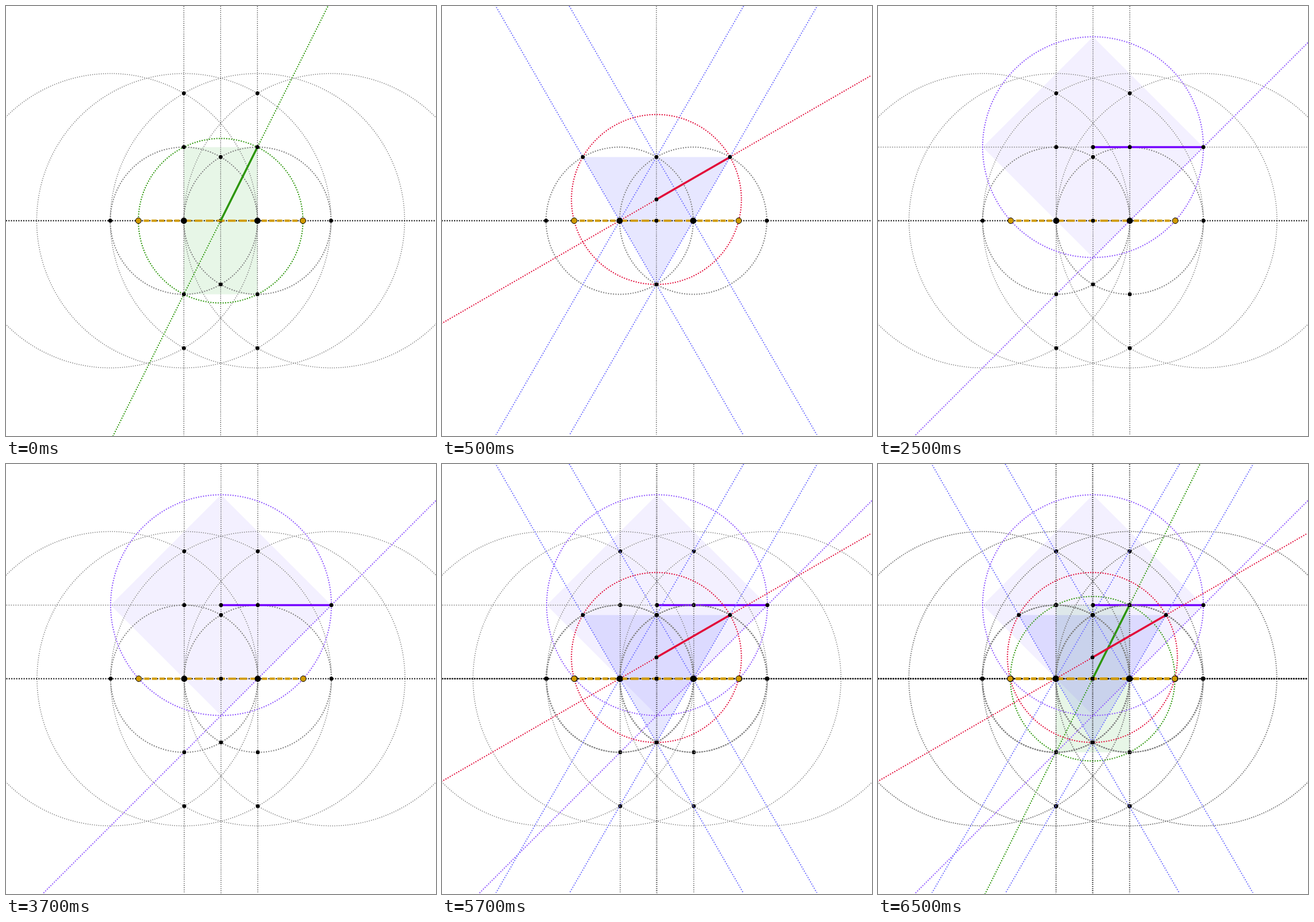
An HTML page with a canvas for the animation above (8 s loop, 748 by 748 pixels).

```html
<!DOCTYPE html>
<html lang="en">
<head>
<meta charset="utf-8">
<title>Golden ratio constructions</title>
<style>
  html, body { margin: 0; width: 100%; height: 100%; overflow: hidden; background: #fff; }
  canvas { display: block; width: 100%; height: 100%; }
</style>
</head>
<body>
<canvas id="stage" width="748" height="748"></canvas>
<script>
const ctx = document.getElementById('stage').getContext('2d');
const SIZE = 748, AXIS = 373.5, U = 64, R3 = Math.sqrt(3);
const GRAY = '#808080', GOLD = '#d09a00', BLUE = '#7676ff';
const GREEN = '#2c960a', RED = '#e20c3a', VIOLET = '#9058ff';
const TIP = U * R3;              // height of the small circles' crossing
const EDGE = U * Math.sqrt(5);   // half the golden segment

// Coordinates are relative to the midpoint of the base segment, y down.
function stroke(color, width, dash) {
  ctx.strokeStyle = color;
  ctx.lineWidth = width;
  ctx.setLineDash(dash);
  ctx.stroke();
}

const dotted = width => [width, 2.3];

function line(x1, y1, x2, y2, color, width, dash = dotted(width)) {
  ctx.beginPath();
  ctx.moveTo(x1, y1);
  ctx.lineTo(x2, y2);
  stroke(color, width, dash);
}

// Dotted line through a point, reaching past the stage.
function ray(x, y, dx, dy, color) {
  const k = 1000 / Math.hypot(dx, dy);
  line(x - dx * k, y - dy * k, x + dx * k, y + dy * k, color, 2);
}

function circle(x, y, r, color, width = 2) {
  ctx.beginPath();
  ctx.arc(x, y, r, 0, 2 * Math.PI);
  stroke(color, width, dotted(width));
}

function polygon(points, color) {
  ctx.beginPath();
  points.forEach(p => ctx.lineTo(...p));
  ctx.fillStyle = color;
  ctx.fill();
}

function dot(x, y, r = 3.4, color = '#000') {
  ctx.beginPath();
  ctx.arc(x, y, r, 0, 2 * Math.PI);
  ctx.fillStyle = color;
  ctx.fill();
  if (color !== '#000') stroke('#000', 1, []);
}

function base() {
  for (const s of [-1, 1]) circle(s * U, 0, 2 * U, GRAY);
  line(-AXIS, 0, AXIS + 2, 0, '#000', 2);
  line(0, -AXIS, 0, AXIS + 2, '#333', 1.3);
}

function grid() {
  for (const s of [-1, 1]) {
    for (const x of [U, 3 * U]) circle(s * x, 0, 4 * U, GRAY, 1.5);
    line(s * U, -AXIS, s * U, AXIS + 2, '#444', 1.4);
  }
}

function gridDots() {
  for (const x of [-U, U])
    for (const y of [2 * U, 2 * TIP]) {
      dot(x, y);
      dot(x, -y);
    }
}

// Gold dashes, longer between the two base points.
function goldBar() {
  for (const s of [-1, 1])
    line(s * (EDGE - 9.5), 0, s * U, 0, GOLD, 3.8, [9, 4.3]);
  for (let k = -3; k <= 3; k++) {
    const x = k * 19.3;
    line(Math.max(-U, x - 6.7), 0, Math.min(U, x + 6.7), 0, GOLD, 3.8, []);
  }
}

function baseDots() {
  for (const s of [-1, 1]) {
    dot(s * 3 * U, 0);
    dot(0, s * TIP);
    dot(s * U, 0, 5.4);
    dot(s * EDGE, 0, 5, GOLD);
  }
}

// Each figure: midpoint x, visible width and height, shaded area, linework.
const rectangle = {
  x: 373.4, w: 748, h: 748,
  fill() {
    polygon([[-U, -2 * U], [U, -2 * U], [U, 2 * U], [-U, 2 * U]], 'rgba(5,155,5,.095)');
  },
  draw() {
    grid();
    base();
    circle(0, 0, EDGE, GREEN);
    ray(0, 0, 1, -2, GREEN);
    dot(0, 0);
    goldBar();
    line(0, 0, U, -2 * U, GREEN, 3.5, []);
    gridDots();
    baseDots();
  }
};

const triangle = {
  x: 373, w: 746, h: 746,
  fill() {
    polygon([[-2 * U, -TIP], [2 * U, -TIP], [0, TIP]], 'rgba(5,5,255,.095)');
  },
  draw() {
    const cy = -TIP / 3;
    base();
    for (const s of [-1, 1])
      for (const y of [-TIP, TIP]) ray(0, y, s, R3, BLUE);
    circle(0, cy, 4 * U / R3, RED);
    ray(0, cy, R3, -1, RED);
    goldBar();
    line(0, cy, 2 * U, -TIP, RED, 3.5, []);
    baseDots();
    for (const x of [-2 * U, 2 * U]) dot(x, -TIP);
    dot(0, cy);
    dot(0, 0);
  }
};

const square = {
  x: 374, w: 748, h: 747, cy: -2 * U, r: 3 * U,
  fill() {
    const { cy, r } = this;
    polygon([[0, cy - r], [r, cy], [0, cy + r], [-r, cy]], 'rgba(135,105,255,.1)');
  },
  draw() {
    const { cy, r } = this;
    grid();
    base();
    line(-AXIS, cy, AXIS + 2, cy, GRAY, 1.7);
    circle(0, cy, r, VIOLET);
    ray(0, U, 1, -1, VIOLET);
    goldBar();
    line(0, cy, r, cy, '#7300ff', 3.5, []);
    gridDots();
    baseDots();
    dot(0, cy);
    dot(r, cy);
    dot(0, 0);
  }
};

const scenes = [
  [0, [rectangle]],
  [500, [triangle]],
  [2500, [square]],
  [4500, [square, triangle]],
  [6500, [rectangle, square, triangle]]
];

// All shaded areas lie below all linework.
function render(figures) {
  ctx.fillStyle = '#fff';
  ctx.fillRect(0, 0, SIZE, SIZE);
  for (const pass of ['fill', 'draw'])
    for (const figure of figures) {
      ctx.save();
      ctx.beginPath();
      ctx.rect(0, 0, figure.w, figure.h);
      ctx.clip();
      ctx.translate(figure.x, AXIS);
      figure[pass]();
      ctx.restore();
    }
}

let shown;
function tick() {
  const t = performance.now() % 8000;
  const [, figures] = scenes.findLast(([start]) => t >= start);
  if (figures !== shown) render(shown = figures);
  requestAnimationFrame(tick);
}
tick();
</script>
</body>
</html>
```
